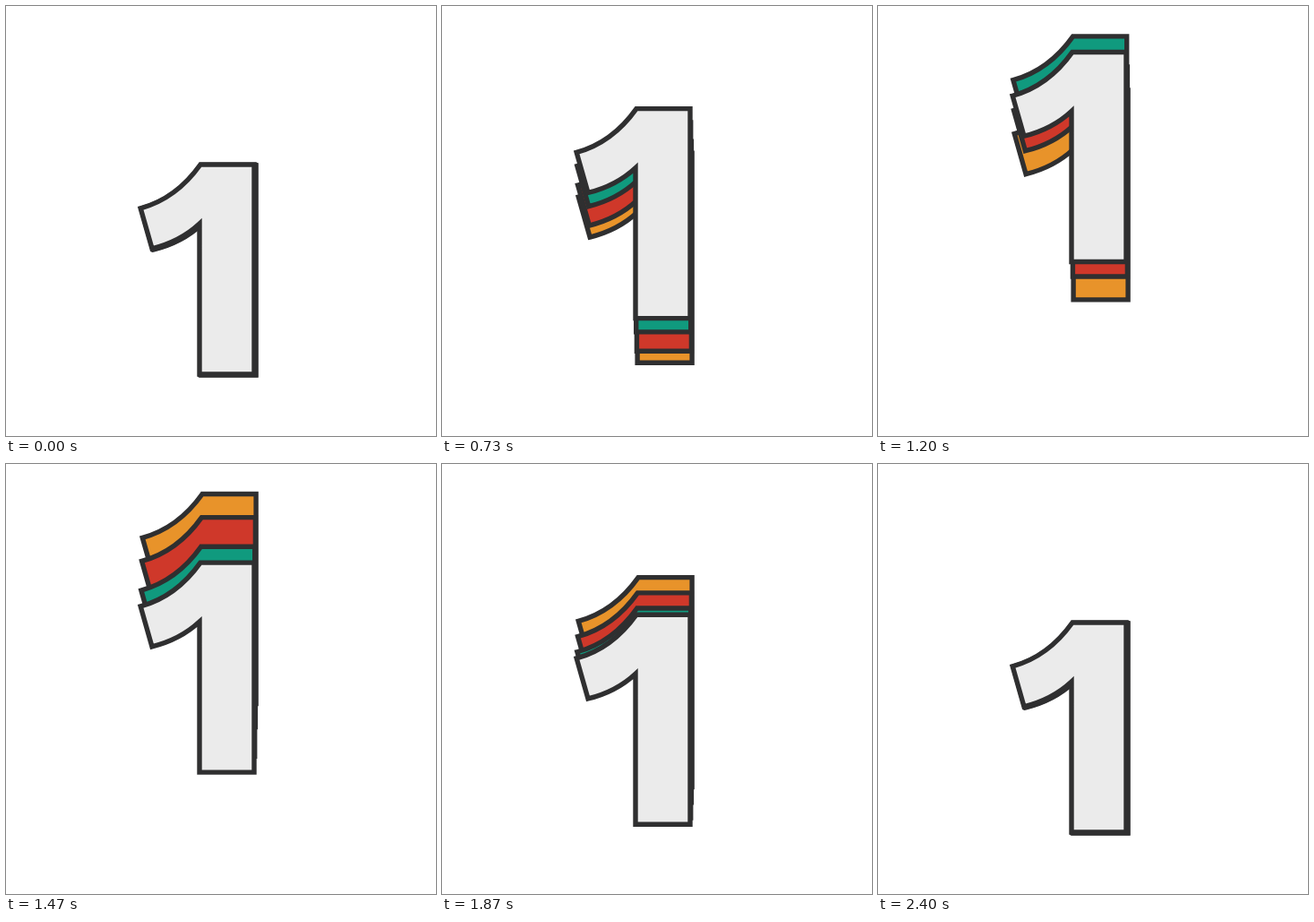
Animation, 480 px wide and 480 px high, one loop 2.47 s. Source, as an HTML page:

```html
<!DOCTYPE html>
<html lang="en">
<head>
<meta charset="utf-8">
<title>Layered numeral</title>
<style>
  html, body { margin: 0; width: 100%; height: 100%; overflow: hidden; background: #fff; }
  svg { display: block; width: 100%; height: 100%; }
  use { stroke: #2f2f30; stroke-width: 5.4; stroke-linejoin: miter; }
</style>
</head>
<body>
<svg viewBox="0 0 480 480">
  <defs>
    <path id="one" d="M217 177H277V411H216V243Q194.5 263 163 270.8L150.2 225.8Q190 215 217 177Z"/>
  </defs>
  <use href="#one" fill="#e8932a"/>
  <use href="#one" fill="#cf382a"/>
  <use href="#one" fill="#109a7e"/>
  <use href="#one" fill="#ebebeb"/>
</svg>
<script>
  const LOOP = 2470, FRAMES = 37, STEP = 66.7;
  const PEAK = 1118, RISE = 995, FALL = 965, HEIGHT = 145;
  const layers = [...document.querySelectorAll('use')].reverse();
  const delay = [0, 0.25, 0.667, 1]; // front to back

  // sine ease-in up to the peak, then the same curve back down
  function lift(t) {
    const x = Math.min(1, t < PEAK ? (PEAK - t) / RISE : (t - PEAK) / FALL);
    return HEIGHT * (1 - Math.sin(x * Math.PI / 2));
  }

  function draw(now) {
    const t = Math.min(FRAMES - 1, Math.floor((now % LOOP + 5) / STEP)) * STEP;
    const lag = 232 + 125 * Math.sin(Math.PI * t / LOOP);
    layers.forEach((layer, depth) => {
      const y = 0.35 * depth - lift(t - lag * delay[depth]);
      layer.setAttribute('transform', `translate(${0.7 * depth} ${y})`);
    });
  }

  let start;
  function tick(now) {
    start ??= now;
    draw(now - start);
    requestAnimationFrame(tick);
  }
  draw(0);
  requestAnimationFrame(tick);
</script>
</body>
</html>
```
